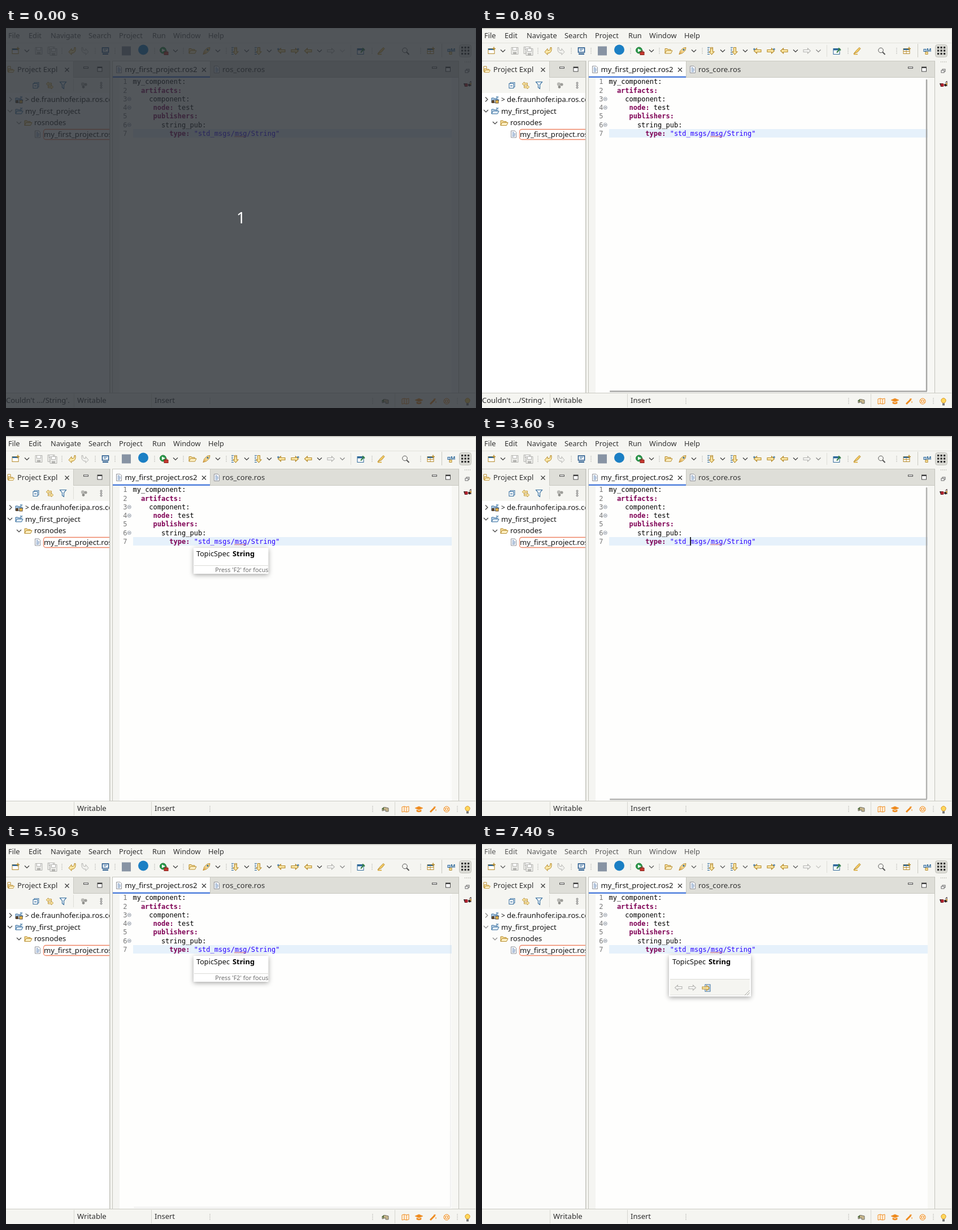
Recreate the animation shown at these times as an HTML page. Size 832 by 673 pixels, loop 8000 ms.

```html
<!DOCTYPE html>
<html lang="en">
<head>
<meta charset="utf-8">
<title>Editor hover</title>
<style>
html, body { margin: 0; width: 100%; height: 100%; overflow: hidden; background: #f5f5f1; }
svg { display: block; width: 832px; height: 673px; font-family: "Noto Sans", "Open Sans", sans-serif; }
text { white-space: pre; }
.mono { font-family: "DejaVu Sans Mono", monospace; }
.shadow { filter: drop-shadow(0 2px 4px rgba(0, 0, 0, .36)); }
</style>
</head>
<body>
<svg id="stage" viewBox="0 0 832 673" xmlns="http://www.w3.org/2000/svg"></svg>
<script>
const INK = '#3c3c3c', GOLD = '#b58a2a', PALE = '#fbe7a6', BLUE = '#2c6799', GREY = '#b5b5b2', ORANGE = '#ee8a1d';
const LINE = '#c9c9c2';

const rect = (x, y, w, h, fill, more = '') =>
  `<rect x="${x}" y="${y}" width="${w}" height="${h}" fill="${fill}" ${more}/>`;
const path = (d, stroke, fill = 'none', w = 1) =>
  `<path d="${d}" stroke="${stroke}" fill="${fill}" stroke-width="${w}"/>`;
const dot = (x, y, r, fill, stroke = 'none') =>
  `<circle cx="${x}" cy="${y}" r="${r}" fill="${fill}" stroke="${stroke}"/>`;
const text = (x, y, s, size = 13, fill = '#161616', more = '') =>
  `<text x="${x}" y="${y}" font-size="${size}" fill="${fill}" ${more}>${s}</text>`;
const at = (x, y, body, turn = 0) =>
  `<g transform="translate(${x} ${y}) rotate(${turn})">${body}</g>`;
const group = (id, body, more = '') => `<g id="${id}" ${more}>${body}</g>`;

// Small parts, all drawn around their own centre
const chevron = path('M-4 -2L0 2L4 -2', INK, 'none', 1.2);
const grip = [-4.5, -1.5, 1.5, 4.5].map(y => rect(-.6, y - .6, 1.2, 1.2, '#a4a49e')).join('');
const arrow = (stroke, fill) => path('M-6.5 0L-1.5 -4.5V-2H6V2H-1.5V4.5Z', stroke, fill, 1.1);
const gold = arrow(GOLD, PALE), pale = arrow(GREY, '#f4f4f2');
const undo = (stroke, fill) => path('M-6 2L-1 -4V-1H2Q4 -1 4 -6H6Q7 3 1 4H-1V7Z', stroke, fill);
const cross = path('M-3.5 -3.5L3.5 3.5M3.5 -3.5L-3.5 3.5', INK, 'none', 1.3);
const minimise = rect(-4, -2, 8, 2.5, '#fff', `stroke="${INK}" stroke-width=".9"`);
const maximise = rect(-4, -4, 8, 8, '#fff', `stroke="${INK}" stroke-width=".9"`) + rect(-4, -4, 8, 2, INK);
const page = path('M-4.5 -6H2L4.5 -3.5V6H-4.5Z', '#8c8f98', '#fff') +
  path('M-2.5 -3H1M-2.5 -.8H3M-2.5 1.4H3M-2.5 3.6H2', '#5c82b4');
const folder = path('M-6 4.5V-4H-2L-1 -2.5H4V0', GOLD, '#f7dfa0') + path('M-6 4.5L-3.5 -.5H7L4.5 4.5Z', GOLD, '#fff2c8');
const blueFolder = path('M-6 5V-3H-2L-1 -2H4V0', BLUE, '#c9dcef') + path('M-6 5L-3.5 0H7L4.5 5Z', BLUE, '#e5eff8');
const disk = path('M-6 -6H6V6H-6Z', GREY, '#ecece9') + rect(-3.5, -6, 7, 5, '#fff', `stroke="${GREY}"`) + rect(-3, 2, 6, 4, GREY);
const frame = (x, y, w, h) => rect(x, y, w, h, '#fff', `stroke="${GOLD}"`) + rect(x, y, w, 2.5, BLUE);
const star = path('M-2 0H2M0 -2V2M-1.5 -1.5L1.5 1.5M1.5 -1.5L-1.5 1.5', BLUE, 'none', .7);
const pen = path('M-6 5L-2 0L4 -6L6 -4L1 2Z', GOLD, '#f4cb66') + path('M-6 6H1', '#d9a62e', 'none', 1.6);
const step = at(1.5, 0, gold, -90) + path('M-6 -6H-2M-6 -3H-3M-6 0H-3M-6 3H-3M-6 6H-2', BLUE) + rect(0, -6, 3, 2, '#fff', `stroke="${GOLD}"`);

function toolbar() {
  const y = 40.5, items = [
    [17, frame(-6, -4, 11, 9) + path('M4 -7V-1M1 -4H7', GOLD, 'none', 1.5)],
    [58, disk], [80, at(0, -1, disk)], [84, at(0, 2, disk)],
    [117, undo(GOLD, PALE)], [140, `<g transform="scale(-1 1)">${undo(GREY, '#f1f1ee')}</g>`],
    [176, rect(-5.5, -5.5, 11, 8, '#fff', 'stroke="#23578c" stroke-width="1.6"') +
      path('M-3 -3H3M-3 -.8H1', BLUE) + path('M-5 5.5H5', '#23578c', 'none', 2)],
    [213, rect(-8, -8, 16, 16, '#8793a3')], [243, dot(0, -2, 9, '#1b7fc4')],
    [279, dot(-1, -1, 5.5, '#2d9b4d', '#1d7837') + path('M-3 -4L3 -1L-3 2Z', 'none', '#fff') +
      rect(1, 2, 7, 5, '#c8382f', 'stroke="#8b221d"') + path('M3 2V0H6V2', '#8b221d')],
    [330, folder],
    [355, path('M-6 6L-4 0L1 -5L6 -6L5 -1L0 4Z', GOLD, '#f5d992') + dot(2, -2, 1.5, BLUE) + path('M-6 6L-1 1', '#d9822b')],
    [405, step], [446, `<g transform="scale(1 -1)">${at(1.5, 0, gold, 90)}${path('M-6 -6H-2M-6 -3H-3M-6 0H-3M-6 3H-3M-6 6H-2', BLUE)}</g>`],
    [488, gold + at(-6, -3, star)], [511, at(0, 0, gold, 180) + at(6, -3, star)],
    [535, gold], [575, at(0, 0, pale, 180)],
    [628, rect(-6, -4, 11, 10, '#fff', `stroke="${BLUE}"`) + rect(-6, -4, 11, 3, BLUE) +
      path('M0 3L6 -4M3 -5L7 -1', '#358148', 'none', 2)],
    [664, pen],
    [707, dot(-1, -1, 4.3, 'none', '#555') + path('M2 2L6.5 6.5', '#555', 'none', 2)],
    [752, frame(-6, -4, 11, 9) + path('M-6 1H5M-1 -2V5', GOLD) + path('M4 -7V-1M1 -4H7', GOLD, 'none', 1.5)],
    [786, rect(-4, -3, 4, 4, '#c4d8ec', `stroke="${BLUE}"`) + rect(-1, 2, 4, 4, '#fbe7a6', `stroke="${GOLD}"`) +
      text(1, 1, 'M', 9, BLUE, 'font-weight="700"')],
  ];
  let out = items.map(([x, body]) => at(x, y, body)).join('');
  for (const x of [99, 158, 193, 263, 314, 390, 648, 734]) out += at(x, y, grip);
  out += group('chevrons', [37, 300, 375, 426, 466, 555].map(x => at(x, y, chevron)).join(''));
  out += group('lastChevron', at(595.5, y, chevron));
  out += rect(610, 30, 1, 21, '#deded8') + rect(771, 28, 1, 24, LINE);
  out += rect(802.5, 29.5, 21, 22, '#dcdcd6', 'rx="4" stroke="#c2c2bb"');
  for (let i = 0; i < 9; i++) out += rect(806 + i % 3 * 5.5, 33 + (i / 3 | 0) * 5.5, 3.2, 3.2, '#303030');
  return out;
}

function menu() {
  const items = [[4, 'File'], [40, 'Edit'], [79, 'Navigate'], [146, 'Search'], [200, 'Project'], [259, 'Run'], [296, 'Window'], [358, 'Help']];
  return group('menu', items.map(([x, s]) => text(x, 18, s, 12.8, '#333')).join(''));
}

function explorer() {
  const tools = [
    [53, rect(-3, -5, 8, 8, '#dce8f4', `stroke="${BLUE}" stroke-width=".8"`) +
      rect(-5, -3, 8, 8, '#fff', `stroke="${BLUE}"`) + path('M-3 1H1', BLUE, 'none', 1.3)],
    [77, at(-1, -2.5, `<g transform="scale(.75)">${gold}</g>`) + at(2, 3, `<g transform="scale(.75)">${gold}</g>`, 180)],
    [101, path('M-5.5 -6H5.5L1.5 -1V6L-1.5 4V-1Z', BLUE, '#f0f6fc', 1.1)],
    [138, dot(-2, -2, 3.2, '#b9b9b5') + dot(3, -1.5, 2.6, '#9d9d99') + dot(-1, 3, 2.4, '#8f8f8b')],
    [168.5, [-4, 0, 4].map(y => dot(0, y, 1.4, '#fff', '#555')).join('')],
  ];
  return rect(0, 58, 184, 30, '#deded8') + rect(0, 58, 119, 30, '#f5f5f1') +
    rect(0, 88, 184, 27, '#f5f5f1') + group('tree', rect(0, 115, 183, 531, '#fff')) +
    rect(0, 58, 184, 1, LINE) + rect(119, 58, 1, 30, LINE) + rect(119, 87, 65, 1, LINE) + rect(119, 90, 1, 22, '#deded8') +
    rect(183, 58, 1.5, 588, '#c2c2bb') +
    at(8, 73, path('M-5 -5H0V4H-5Z', GOLD, '#fff') + `<g transform="translate(1 2) scale(.8)">${folder}</g>`) +
    text(20, 77.8, 'Project Expl', 13, '#333') + at(108, 74, cross) + at(141.5, 71, minimise) + at(166, 73, maximise) +
    tools.map(([x, b]) => at(x, 101.5, b)).join('') +
    '<g clip-path="url(#treeClip)">' +
    group('twists', at(8, 126.5, chevron, -90) + at(7, 147, chevron) + at(23, 168, chevron)) +
    at(23, 127, blueFolder + rect(-6, 1, 5, 5, '#5c4630') + rect(1, 1, 5, 5, '#f0c04c', 'stroke="#5c4630"') + path('M2 -6L6 -3M6 -6L2 -3', BLUE)) +
    text(34, 131, '&gt;', 12) + text(44, 131, 'de.fraunhofer.ipa.ros.core', 13) +
    at(23, 147, blueFolder + path('M2 -6L6 -3M6 -6L2 -3', BLUE)) + text(34, 151.5, 'my_first_project', 13.1) +
    at(39, 168, folder) + text(50, 172, 'rosnodes', 12.9) +
    rect(66.5, 179.5, 140, 18, '#fff', 'rx="4" stroke="#ee8565" stroke-width="1.3"') +
    at(56, 188, page) + text(67, 192.7, 'my_first_project.ros2', 13.1) + '</g>';
}

function code() {
  const key = s => `<tspan fill="#7f0055" font-weight="700">${s}</tspan>`;
  const rows = [
    [0, 'my_component:'], [2, key('artifacts:')], [4, 'component:'], [5, key('node:') + ' test'],
    [5, key('publishers:')], [7, 'string_pub:'],
    [9, key('type:') + ' <tspan fill="#2a00ff">"std_msgs/msg/String"</tspan>'],
  ];
  return rows.map(([col, s], i) => {
    const y = 99.4 + i * 15.25;
    return text(214.5, y, i + 1, 12, '#787878', 'class="mono" text-anchor="end"') +
      text(224.5 + col * 7.2, y, s, 12, '#000', 'class="mono"') +
      ([2, 3, 5].includes(i) ? at(218.3, y - 4.2, dot(0, 0, 3, '#fff', '#8f98a5') + path('M-1.7 0H1.7', '#5f6977')) : '');
  }).join('');
}

function editor() {
  return rect(188, 58, 614, 30, '#deded8') + rect(189, 59, 172, 29, '#fefefd') + rect(189, 88, 612, 558, '#fefefd') +
    rect(188, 58, 614, 1, LINE) + rect(188, 58, 1, 588, '#c2c2bb') + rect(801, 58, 1, 588, '#c2c2bb') +
    rect(361, 58, 1, 30, LINE) + rect(361, 87, 440, 1, LINE) + rect(189, 85.5, 172, 2.5, '#4f7fdc') +
    at(200, 73.5, page) + text(210.5, 77.8, 'my_first_project.ros2', 13.1) + at(350.5, 74, cross) +
    at(373, 73.5, page) + text(383, 77.8, 'ros_core.ros', 13.2, '#333') +
    at(758.5, 71, minimise) + at(782.5, 73, maximise) +
    rect(189, 88, 12, 558, '#f5f5f2') + rect(789, 88, 12, 558, '#f7f7f4') +
    rect(225, 179, 564, 15, '#e6f1fb') + code() +
    path('M404 191.5' + 'l1.5 1.4l1.5 -1.4'.repeat(7), '#c5283c', 'none', .8) +
    group('caret', rect(368.3, 179, 1.6, 15, '#000')) +
    group('bars', rect(785.8, 91, 2.5, 552, '#a6a6a4', 'rx="1"') + rect(226, 642.3, 562, 2.5, '#a6a6a4', 'rx="1"'));
}

function sides() {
  const icons = [
    [671, path('M-5 3V-1Q-2 -5 2 -3L6 -2V4H1V1Z', '#6f6f68', '#c8b68b') + path('M-6 -1L-2 -4V2Z', 'none', '#587244')],
    [707, path('M-6 -4L-2 -5L2 -4L6 -5V4L2 5L-2 4L-6 5ZM-2 -5V4M2 -4V5', ORANGE, '#fff5e6')],
    [731, path('M-7 -2L0 -5L7 -2L0 1ZM-4 1L0 3L4 1V4L0 5L-4 4Z', ORANGE, ORANGE, .6)],
    [756, path('M-5 5L3 -3', ORANGE, 'none', 3) + path('M3 -5V-2M1 -4H5M5 0V3', ORANGE)],
    [780, dot(0, 0, 5, '#fff5e6', ORANGE) + dot(0, 0, 2.2, 'none', ORANGE) + path('M-4 -3L-2 -1M4 -3L2 -1M-4 3L-2 1M4 3L2 1', ORANGE)],
    [817, path('M-2 3Q-5 0 -4 -3Q0 -8 4 -3Q5 0 2 3Z', '#d9982a', '#ffd85c') + rect(-2, 3.5, 4, 4, '#777')],
  ];
  return rect(0, 646, 832, 1, LINE) + group('status', text(0, 664.3, "Couldn't .../String'.", 13, '#2e2e2e')) +
    text(126, 664.3, 'Writable', 13.1, '#2e2e2e') + text(263, 664.3, 'Insert', 13, '#2e2e2e') +
    [120, 257, 688].map(x => rect(x, 648, 1, 24, '#d6d6d0')).join('') +
    [361, 649, 799].map(x => at(x, 660.5, grip)).join('') +
    icons.map(([x, b]) => at(x, 661, b)).join('') +
    at(817, 60, grip, 90) +
    at(817, 76, rect(-2, -3, 5, 4, '#fff', 'stroke="#666"') + rect(-4, -1, 5, 4, '#fff', 'stroke="#666"')) +
    at(817, 100, path('M-7 -2H0V4H-5Z', 'none', '#3a2426') + dot(-2, 1, 2.8, '#b4232f') + dot(3.5, 1, 2.4, '#2b2224') +
      path('M3 -3L6 -6V3', '#3a2426') + dot(5.5, -1, 1.5, '#d59b31')) +
    rect(831, 0, 1, 673, '#deded8');
}

const label = text(337, 212.6, 'TopicSpec', 12.7, '#111') + text(401, 212.6, 'String', 12.9, '#000', 'font-weight="700"');
const hover = () => rect(332, 198, 132.5, 46, '#fff', 'class="shadow"') + label +
  rect(333, 229, 131, 1, '#dcdcd8') + text(464.5, 240.8, "Press 'F2' for focus", 10.8, '#6d6d6d', 'text-anchor="end"');
const pinned = () => rect(331, 197, 145, 73, '#fff', 'class="shadow"') + rect(333, 239, 141, 29, '#f5f5f1') + label +
  rect(333, 239, 141, 1, '#dcdcd8') + rect(333, 267, 141, 1, '#e2e2de') + at(348, 254.5, pale) + at(372, 254.5, pale, 180) +
  at(397, 255, rect(-2, -6, 9, 12, '#fff', `stroke="${BLUE}"`) + path('M3 -3H6M4 0H6M3 3H6', BLUE) + at(-1, 0, gold, 180)) +
  path('M465 268L474 259M469 268L474 263', '#a9a9a5');

const stage = document.getElementById('stage');
stage.innerHTML = '<clipPath id="treeClip"><rect y="115" width="183" height="531"/></clipPath>' +
  rect(0, 0, 832, 673, '#f5f5f1') + group('edge', rect(0, 0, 832, 1.5, '#bcbcb5')) +
  menu() + rect(0, 26, 832, 1, '#e2e2dc') + toolbar() + explorer() + editor() + sides() +
  group('hover', hover()) + group('pinned', pinned()) +
  group('veil', rect(0, 0, 832, 673, '#282d34', 'opacity=".8"') + text(416, 346.3, '1', 28, '#fff', 'text-anchor="middle"'));

const el = {};
stage.querySelectorAll('g[id]').forEach(g => el[g.id] = g);
const clamp = v => Math.max(0, Math.min(1, v));
const mix = (a, b, k) => a + (b - a) * k;
const show = (id, on) => el[id].setAttribute('opacity', +on);
const within = (t, a, b) => t >= a && t < b;

function barLevel(t) {
  const rise = start => 1 - (1 - clamp((t - start) / 1000)) ** 3;
  const fall = start => (1 - clamp((t - start) / 1000)) ** 3;
  if (t < 2000) return rise(0);
  if (t < 3100) return t < 2800 ? fall(2000) : 0;
  if (t < 5000) return rise(3100);
  return t < 5900 ? fall(5000) : 0;
}

// The screen was refreshed ten times a second
function update(ms) {
  const t = Math.floor(ms / 100) * 100;
  const focus = clamp((t - 100) / 300) * (1 - clamp((t - 7000) / 400));
  show('veil', t < 100);
  show('status', t < 1500);
  show('caret', within(t, 900, 7100) && Math.floor((t - 900) / 600) % 2 === 0);
  show('hover', within(t, 1200, 3200) || within(t, 4500, 7100));
  show('pinned', t >= 7100);
  show('bars', barLevel(t));
  show('menu', mix(.8, 1, focus));
  show('edge', mix(.45, 1, focus));
  show('tree', mix(.75, 1, focus));
  show('twists', mix(.6, 1, focus));
  show('chevrons', mix(.85, 1, focus));
  show('lastChevron', mix(.25, .6, focus));
}

const start = performance.now();
(function tick() {
  update((performance.now() - start) % 8000);
  requestAnimationFrame(tick);
})();
</script>
</body>
</html>
```
